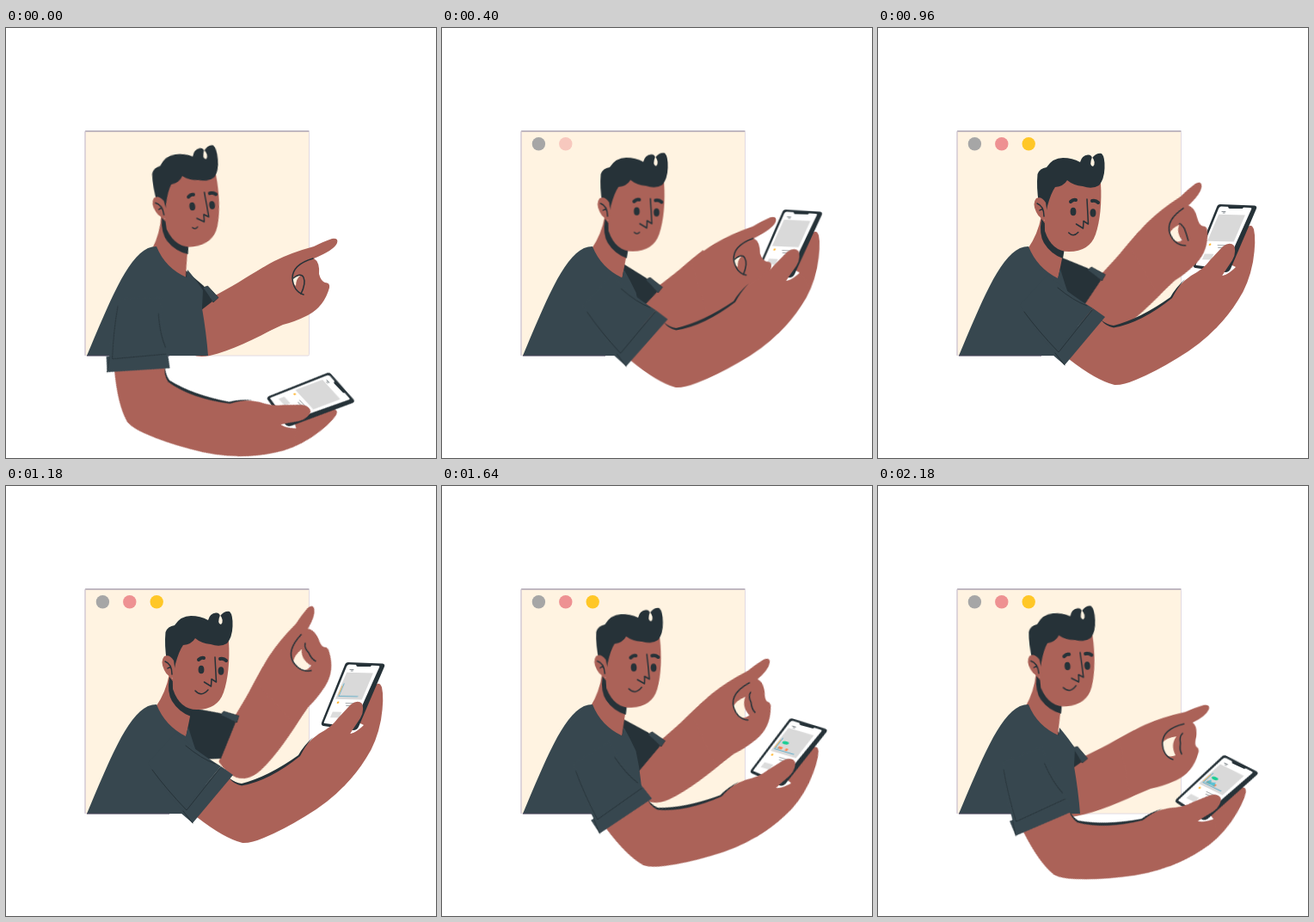
An HTML page that plays this animation: 500x500 px, repeating every 2.2 s.

```html
<!DOCTYPE html>
<html lang="en">
<head>
<meta charset="utf-8">
<title>Swiping on a phone</title>
<style>
  html, body { margin: 0; width: 100%; height: 100%; overflow: hidden; background: #fff; }
  svg { display: block; width: 100vw; height: 100vh; }

  .skin { fill: #ab6258; }
  .shirt { fill: #37474f; }
  .dark { fill: #263238; }
  .line { fill: none; stroke: #263238; stroke-width: 1.5; stroke-linecap: round; stroke-linejoin: round; }

  .front, .sleeve, .back, .hand, .head, .palm, .torso, .mouth, .dot, .axis, .pop, .area {
    animation: 2200ms linear infinite both;
  }

  /* arm that holds the phone; the forearm lags a little behind its sleeve */
  .front, .sleeve { transform-origin: 157.7px 280px; }
  .front { animation-name: front; }
  @keyframes front {
    0% { transform: translate(0, 0) rotate(46.6deg); animation-timing-function: cubic-bezier(.33, 1, .68, 1); }
    26.4% { transform: translate(0, 0) rotate(0deg); }
    59.1% { transform: translate(0, 0) rotate(0deg); animation-timing-function: cubic-bezier(.37, 0, .63, 1); }
    86.4%, 100% { transform: translate(-2.5px, 0) rotate(25deg); }
  }
  .sleeve { animation-name: sleeve; }
  @keyframes sleeve {
    0% { transform: rotate(46.6deg); animation-timing-function: cubic-bezier(.33, 1, .68, 1); }
    26.4% { transform: rotate(0deg); }
    59.1% { transform: rotate(0deg); animation-timing-function: cubic-bezier(.37, 0, .63, 1); }
    86.4%, 100% { transform: rotate(26.8deg); }
  }

  .head { transform-origin: 175px 291px; animation-name: head; }
  @keyframes head {
    0% { transform: rotate(-7.4deg); animation-timing-function: cubic-bezier(.33, 1, .68, 1); }
    29.1% { transform: rotate(0deg); }
    59.1% { transform: rotate(0deg); animation-timing-function: cubic-bezier(.37, 0, .63, 1); }
    86.4%, 100% { transform: rotate(-4.8deg); }
  }

  /* arm that taps and swipes */
  .back { transform-origin: 173px 246px; animation-name: back; }
  @keyframes back {
    0% { transform: rotate(0deg); animation-timing-function: cubic-bezier(.37, 0, .63, 1); }
    27.3% { transform: rotate(-11.6deg); }
    31.8% { transform: rotate(-11.6deg); animation-timing-function: cubic-bezier(.4, 0, .75, .85); }
    59.1% { transform: rotate(-35deg); animation-timing-function: cubic-bezier(.37, 0, .63, 1); }
    86.4%, 100% { transform: rotate(2.7deg); }
  }

  .hand { transform-origin: 293px 302px; animation-name: hand; }
  @keyframes hand {
    0%, 11% { transform: rotate(0deg); animation-timing-function: ease-in-out; }
    27.3% { transform: rotate(11.6deg); }
    31.8% { transform: rotate(11.6deg); animation-timing-function: ease-in-out; }
    46%, 100% { transform: rotate(0deg); }
  }

  .palm { animation-name: palm; }
  @keyframes palm {
    0%, 34% { d: path("M283 289Q300 277 312 271Q332 261 358 254Q370 248 379 245Q387 244 385 250Q382 258 358 268Q365 272 364 286Q366 294 371 296Q377 296 376 302Q370 324 351 334Q335 342 322 345L298 356ZM333 291Q336 288 342 288Q337 292 337 300Q333 297 333 291Z"); }
    50%, 100% { d: path("M283 289Q300 277 312 271Q332 261 358 254Q370 248 379 245Q387 244 385 250Q382 258 367 266Q373 270 372 282Q370 292 373 294Q377 296 375 302Q370 324 351 334Q335 342 322 345L298 356ZM333 291Q337 285 349 283Q342 293 349 305Q335 311 333 291Z"); }
  }

  .curl { animation-name: curl; }
  @keyframes curl {
    0%, 34% { d: path("M334 291Q343 284 346 290Q349 297 343 309"); }
    50%, 100% { d: path("M356 279Q352 283 354 291Q353 298 356 303"); }
  }

  .torso { animation-name: torso; }
  @keyframes torso {
    0%, 10% { d: path("M94 381C120 320 140 268 165 256Q170 254 175 254Q185 279 210 290L211 281Q222 294 229 305L228 326Q233 355 235 381Z"); }
    27.3%, 68.2% { d: path("M94 381C120 320 140 268 165 256Q170 254 175 254Q185 279 209 291L212 280Q216 294 222 311L230 326Q233 355 235 381Z"); }
    81%, 100% { d: path("M94 381C120 320 140 268 165 256Q170 254 175 254Q185 279 210 290L211 281Q222 294 229 305L228 326Q233 355 235 381Z"); }
  }

  .mouth { animation-name: mouth; }
  @keyframes mouth {
    0%, 33% { d: path("M224 238Q227 241 230 238"); }
    52%, 100% { d: path("M220 238Q227 246 235 237"); }
  }

  /* window buttons fade in one after another */
  .dot { animation-name: dot; }
  @keyframes dot {
    0%, 2.73% { opacity: 0; }
    16.36%, 100% { opacity: 1; }
  }
  .dot.two { animation-name: dot2; }
  @keyframes dot2 {
    0%, 12.27% { opacity: 0; }
    25.9%, 100% { opacity: 1; }
  }
  .dot.three { animation-name: dot3; }
  @keyframes dot3 {
    0%, 21.8% { opacity: 0; }
    35.45%, 100% { opacity: 1; }
  }

  /* chart on the phone */
  .axis { fill: none; stroke-dasharray: 44; animation-name: axis; }
  @keyframes axis {
    0%, 44% { stroke-dashoffset: 44; opacity: 0; }
    44.1% { stroke-dashoffset: 44; opacity: 1; }
    55%, 100% { stroke-dashoffset: 0; opacity: 1; }
  }
  .pop { transform-box: fill-box; transform-origin: 0 50%; animation-name: pop; }
  @keyframes pop {
    0%, 58% { transform: scale(0); }
    68%, 100% { transform: scale(1); }
  }
  .area { transform-box: fill-box; transform-origin: 0 100%; animation-name: area; }
  @keyframes area {
    0%, 66% { transform: scale(0); }
    100% { transform: scale(1); }
  }
</style>
</head>
<body>
<svg viewBox="0 0 500 500" preserveAspectRatio="xMidYMid meet">
  <!-- window -->
  <rect x="92" y="120" width="260.5" height="261" rx="1.5" fill="#fff3e1" stroke="#e2dae2"/>
  <path d="M92 120H352.5" stroke="#92879a" stroke-width="1.2"/>
  <path d="M92 120V381" stroke="#cbc0cc" stroke-width="1"/>
  <circle class="dot" cx="112.4" cy="134.7" r="7.7" fill="#a6a6a6"/>
  <circle class="dot two" cx="143.8" cy="134.7" r="7.7" fill="#ee9192"/>
  <circle class="dot three" cx="175.2" cy="134.7" r="7.7" fill="#ffc727"/>

  <!-- fingers behind the phone, and the phone -->
  <g class="front">
    <path class="skin" d="M340 315L405 270L428 233Q434 226 437 234Q440 247 436 272Q431 298 419 316Q408 334 393 349L350 363Z"/>
    <path fill="#fff" d="M400 288L408 274L416 278Q409 285 402 288Z"/>
    <path class="dark" d="M398 205L438 206.500Q441 207 440 210L410 280Q408 284 404 284L369 279Q366 278 367 275L394 208Q395 205 398 205Z"/>
    <path fill="#fff" d="M399 207.500L433 209Q435 209 434 211L404 278Q403 280 401 280L371 276Q369 276 370 274L396 210Q397 207.500 399 207.500Z"/>
    <path class="dark" d="M407 206.500H426L424 210H409Q407 210 407 206.500Z"/>
    <g transform="matrix(.96 .02 -.41 .97 397 208)">
      <rect x="3" y="9" width="32" height="32" fill="#d9d9d9"/>
      <path d="M5 5.500H10M7 7H10" stroke="#8b9296" stroke-width="1"/>
      <circle cx="7.800" cy="45" r="1.300" fill="#ffb52e"/>
      <path d="M17 45.500H32M19 48.500H32M22 51.500H30" stroke="#a9adaf" stroke-width="1.200"/>
      <rect x="6" y="56" width="11" height="7" fill="#dcdcdc"/>
      <path class="axis" d="M5.500 22V37.500H30" stroke="#74b4cb" stroke-width="1.200"/>
      <path class="axis" d="M4.500 25V36" stroke="#f3b45f" stroke-width="1"/>
      <ellipse class="pop" cx="12" cy="27" rx="4" ry="2" fill="#19ce94"/>
      <path class="pop" d="M8 33H13V36H8ZM17 33H20V36H17Z" fill="#ff8551"/>
      <path class="area" d="M7 36L10 30L13 33L17 31L20 36Z" fill="#39bfd8" opacity=".8"/>
    </g>
  </g>

  <!-- pointing arm -->
  <g class="back">
    <path class="skin" d="M200 348L237 314C262 302 280 289 300 278Q318 302 318 346C289 362 262 375 237 381Q203 388 200 348Z"/>
    <g class="hand">
      <path class="skin palm" fill-rule="evenodd" d="M283 289Q300 277 312 271Q332 261 358 254Q370 248 379 245Q387 244 385 250Q382 258 358 268Q365 272 364 286Q366 294 371 296Q377 296 376 302Q370 324 351 334Q335 342 322 345L298 356ZM333 291Q336 288 342 288Q337 292 337 300Q333 297 333 291Z"/>
      <path class="line" d="M357 268Q333 275 333 291Q334 306 346 310"/>
      <path class="line palm curl" d="M334 291Q343 284 346 290Q349 297 343 309"/>
    </g>
    <path class="dark" d="M180 268L202 276L230 300L240 318L204 346L164 325Z"/>
    <path class="shirt" stroke="#263238" stroke-width=".8" d="M229 302L234.500 300L247 313.500L241 319Z"/>
  </g>

  <!-- head -->
  <g class="head">
    <path class="skin" d="M190 218Q186 240 174 257L182 284L208 298L216 258Z"/>
    <path class="dark" d="M190 222Q187 240 193 250Q201 263 215 268L217 256Z"/>
    <path class="skin" d="M193 190L194 236Q202 260 222 260Q246 260 253 240Q261 216 259 180L220 168Z"/>
    <path class="dark" d="M187 204Q184 185 185.500 170Q188 163 196 162Q203 151 215 151Q226 151 235 156Q237 148 244 147.500Q248 147 249 151Q254 145 260 146Q264 150 263.500 163Q263 176 257 183Q249 188 238 184Q227 183 220 177Q216 184 206 185Q201 192 197 207L194 222L190 210Z"/>
    <path fill="#fff3e1" d="M249 150Q254 157 250 161Q245 160 249 150Z"/>
    <path class="skin" d="M195 203Q190 195 184 198Q179 204 184 214Q188 223 198 224Z"/>
    <path class="line" d="M185 204Q193 207 193 219M188 212Q191 210 192 212"/>
    <ellipse class="dark" cx="227" cy="213.500" rx="3.400" ry="4.700"/>
    <ellipse class="dark" cx="250" cy="215" rx="3.400" ry="4.700"/>
    <path class="line" style="stroke-width:4" d="M224 202Q227 199 230 200M249 201Q253 200 256 203"/>
    <path class="line" d="M243 199L244.500 228L239 224.500L238.500 233L230.500 228"/>
    <path class="line mouth" d="M224 238Q227 241 230 238"/>
  </g>

  <path class="shirt torso" d="M94 381C120 320 140 268 165 256Q170 254 175 254Q185 279 210 290L211 281Q222 294 229 305L228 326Q233 355 235 381Z"/>
  <path d="M94 381H190" stroke="#454358" stroke-width="1"/>

  <!-- forearm and thumb -->
  <g class="front">
    <path class="skin" d="M216 380L252 334Q266 346 274 347Q304 340 340 314Q348 299 364 288Q379 280 386 270L401 254Q409 248 414 253Q417 261 412 270L400 288Q414 286 419 278L428 295Q415 325 393 349Q375 368 348 384Q322 400 300 409Q285 415.500 275 415Q254 410 222 385Z"/>
    <path class="dark" d="M259 339Q266 345 274 346Q305 338 340 313Q346 302 357 292Q348 302 342 314Q306 343 274 348.500Q265 347 259 339Z"/>
  </g>
  <g class="sleeve">
    <path class="shirt" d="M198 286Q214 304 250 326L206 378Q184 354 165 322Z"/>
    <path class="shirt" d="M203 380L250 326L264 336L217 392Z"/>
    <path class="line" style="stroke-width:1" d="M170 330Q186 352 210 377L249 328M209 302Q227 317 243 323M206 378L217 392"/>
  </g>
</svg>
</body>
</html>
```
